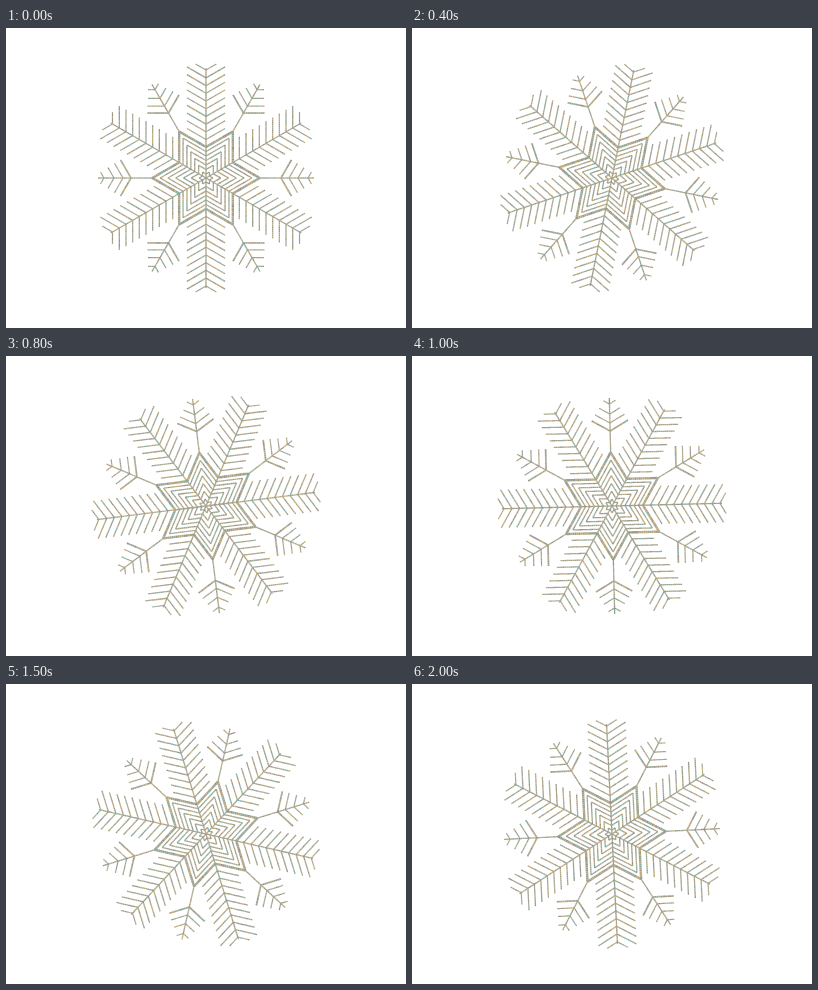
An HTML page with a canvas for the animation above (2100 ms loop, 400x300 px).

```html
<!DOCTYPE html>
<html lang="en">
<head>
<meta charset="utf-8">
<title>Snowflake</title>
<style>
html, body { margin: 0; width: 100%; height: 100%; overflow: hidden; background: #fff; }
canvas { display: block; }
</style>
</head>
<body>
<canvas id="stage" width="400" height="300"></canvas>
<script>
const ctx = document.getElementById('stage').getContext('2d');
const STEPS = 21, STEP_MS = 100, SIXTH = Math.PI / 3;
const TINTS = ['#a89f86', '#98a08f', '#b3a78d', '#99948a', '#a9a48f', '#86aea3', '#c0a970'];
const lines = [];

// Arms are laid out pointing along +x, with branches 60 degrees off the axis.
function add(x1, y1, x2, y2, width, turn) {
  const c = Math.cos(turn), s = Math.sin(turn);
  lines.push([x1 * c - y1 * s, x1 * s + y1 * c, x2 * c - y2 * s, x2 * s + y2 * c, width]);
}

function fork(r, len, width, turn) {
  const dx = len * Math.cos(SIXTH), dy = len * Math.sin(SIXTH);
  add(r, 0, r + dx, dy, width, turn);
  add(r, 0, r + dx, -dy, width, turn);
}

function mainArm(turn) {
  add(0, 0, 110, 0, 1.3, turn);
  // Inner forks meet their neighbours and form nested stars.
  for (let r = 4; r < 30; r += 4.5) fork(r, r, 1.3, turn);
  fork(31, 31, 2.4, turn);
  for (let i = 0; i < 9; i++) fork(38.5 + i * 7.7, 22, 1.3, turn);
  fork(108, 12, 1.2, turn);
}

function sideArm(turn) {
  add(53, 0, 108, 0, 1.3, turn);
  fork(75, 21, 1.7, turn);
  fork(83, 17, 1.2, turn);
  fork(92, 12, 1.2, turn);
  fork(102, 7, 1.2, turn);
}

for (let i = 0; i < 6; i++) {
  mainArm((i + 0.5) * SIXTH);
  sideArm(i * SIXTH);
}

function seeded(seed) {
  return () => {
    seed = (seed * 1664525 + 1013904223) >>> 0;
    return seed / 4294967296;
  };
}

function glitterLine([x1, y1, x2, y2, width], rand) {
  const n = Math.max(1, Math.round(Math.hypot(x2 - x1, y2 - y1) / 2));
  const dx = (x2 - x1) / n, dy = (y2 - y1) / n;
  ctx.lineWidth = width;
  for (let i = 0; i < n; i++) {
    ctx.strokeStyle = TINTS[Math.floor(rand() * TINTS.length)];
    ctx.beginPath();
    ctx.moveTo(x1 + dx * i, y1 + dy * i);
    ctx.lineTo(x1 + dx * (i + 1), y1 + dy * (i + 1));
    ctx.stroke();
  }
}

function draw(step) {
  const rand = seeded(step * 7919 + 17);
  ctx.setTransform(1, 0, 0, 1, 0, 0);
  ctx.fillStyle = '#fff';
  ctx.fillRect(0, 0, 400, 300);
  ctx.translate(200, 150);
  ctx.rotate(step / STEPS * SIXTH);
  for (const line of lines) glitterLine(line, rand);
}

let shown = -1;
function tick() {
  const step = Math.floor(performance.now() / STEP_MS) % STEPS;
  if (step !== shown) draw(shown = step);
  requestAnimationFrame(tick);
}
tick();
</script>
</body>
</html>
```
